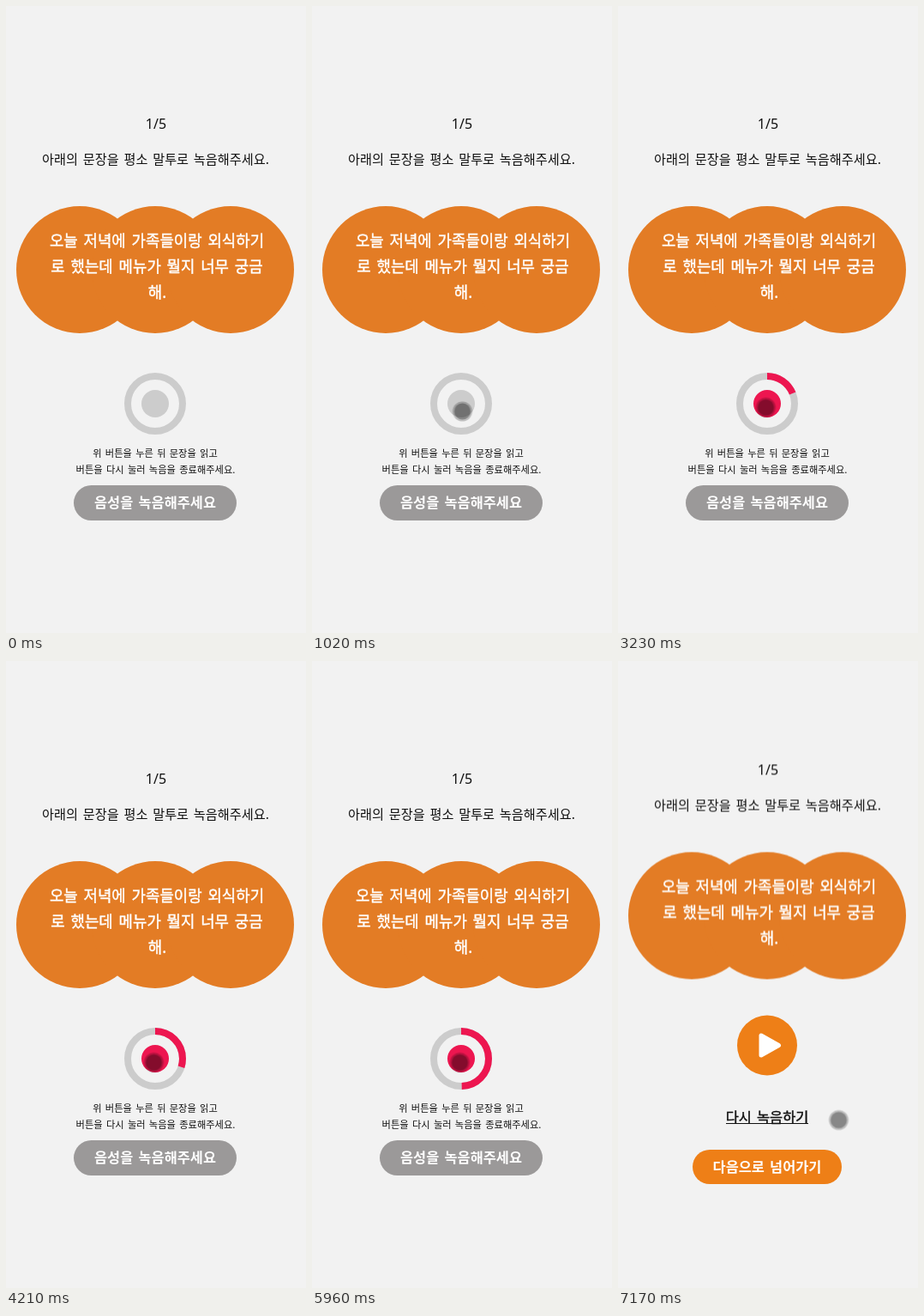
Write an HTML page that moves like this. It is 350 px wide and 730 px high and loops after 7890 ms.

```html
<!DOCTYPE html>
<html lang="ko">
<head>
<meta charset="utf-8">
<title>음성 녹음</title>
<style>
  html, body { margin: 0; width: 100%; height: 100%; overflow: hidden; background: #f2f2f2; }
  svg { display: block; width: 100%; height: 100%; }
  text {
    font-family: "Noto Sans CJK KR", "Noto Sans CJK", sans-serif;
    font-size: 15.2px; fill: #111; text-anchor: middle; word-spacing: .1em;
  }
  .count { font-family: "Noto Sans", sans-serif; font-size: 16px; }
  .bubble { fill: #e37c25; }
  /* A thin outline gives the medium weight between regular and bold. */
  .sentence text { font-size: 17.85px; fill: #fff; stroke: #fff; stroke-width: .45px; }
  .hint text { font-size: 11.25px; }
  .label { font-size: 16.4px; font-weight: 700; fill: #fff; }
  .again { font-size: 16.4px; stroke: #111; stroke-width: .45px; }
  .accent { fill: #ee7f17; }
  .ring { fill: none; stroke: #ccc; stroke-width: 8; }
  .arc { stroke: #ed1650; stroke-dasharray: 0 720; }

  .arc, .dot, .record, .review, .prompt, .cursor { animation: 7890ms linear infinite; }
  .arc { animation-name: progress; }
  .cursor { animation-name: wander; }
  .dot, .record, .review, .prompt { animation-timing-function: step-end; }
  .dot { animation-name: live; }
  .record { animation-name: leave; }
  .review { animation-name: enter; }
  .prompt { animation-name: lift; }

  @keyframes progress {
    0%, 19.65% { stroke-dasharray: 0 720; }
    77.18%, 100% { stroke-dasharray: 183.9 720; }
  }
  @keyframes live {
    0% { fill: #ccc; }
    15.46% { fill: #ed1650; }
    76.42%, 100% { fill: #ccc; }
  }
  @keyframes leave { 0% { opacity: 1; } 77.18%, 100% { opacity: 0; } }
  @keyframes enter { 0% { opacity: 0; } 77.18%, 100% { opacity: 1; } }
  @keyframes lift {
    0% { transform: none; }
    77.18%, 100% { transform: translateY(-10.5px); }
  }
  @keyframes wander {
    0%, 2.53% { transform: translate(328px, 700px); opacity: 0; }
    2.54% { transform: translate(328px, 700px); opacity: 1; }
    3.42% { transform: translate(302px, 628px); }
    4.31% { transform: translate(270px, 548px); }
    5.2% { transform: translate(236px, 490px); }
    6.08% { transform: translate(195px, 465px); }
    7.1% { transform: translate(170px, 459px); }
    12.17%, 15.46% { transform: translate(175.5px, 472px); }
    25.98% { transform: translate(174.5px, 470px); }
    35.49%, 78.2% { transform: translate(172.5px, 467.5px); }
    84.16%, 87.5% { transform: translate(259px, 545px); }
    90.87%, 100% { transform: translate(257.5px, 534.5px); opacity: 1; }
  }
</style>
</head>
<body>
<svg viewBox="0 0 350 730">
  <g class="prompt">
    <text class="count" x="175" y="142.5">1/5</text>
    <text x="174.5" y="184">아래의 문장을 평소 말투로 녹음해주세요.</text>
    <g class="bubble">
      <circle cx="86" cy="307" r="74"/>
      <circle cx="174" cy="307" r="74"/>
      <circle cx="262" cy="307" r="74"/>
    </g>
    <g class="sentence">
      <text x="176" y="280">오늘 저녁에 가족들이랑 외식하기</text>
      <text x="176" y="310">로 했는데 메뉴가 뭘지 너무 궁금</text>
      <text x="176.5" y="340">해.</text>
    </g>
  </g>

  <g class="record">
    <circle class="ring" cx="174" cy="463" r="32"/>
    <circle class="ring arc" cx="174" cy="463" r="32" pathLength="360" transform="rotate(-90 174 463)"/>
    <circle class="dot" cx="174" cy="463" r="16"/>
    <g class="hint">
      <text x="174" y="525">위 버튼을 누른 뒤 문장을 읽고</text>
      <text x="174.5" y="544">버튼을 다시 눌러 녹음을 종료해주세요.</text>
    </g>
    <rect x="79" y="558" width="190" height="41" rx="20.5" fill="#9b9999"/>
    <text class="label" x="174" y="583.5">음성을 녹음해주세요</text>
  </g>

  <g class="review">
    <circle class="accent" cx="174" cy="447.5" r="35"/>
    <path d="M167 436V459L187.5 447.5Z" fill="#fff" stroke="#fff" stroke-width="5" stroke-linejoin="round"/>
    <text class="again" x="174" y="537">다시 녹음하기</text>
    <path d="M126 538.5H222" stroke="#111"/>
    <rect class="accent" x="87" y="569" width="174" height="40" rx="20"/>
    <text class="label" x="174" y="594.5">다음으로 넘어가기</text>
  </g>

  <g class="cursor">
    <circle r="11.5" fill="#000" fill-opacity=".22"/>
    <circle r="9.5" fill="#000" fill-opacity=".29"/>
  </g>
</svg>
</body>
</html>
```
